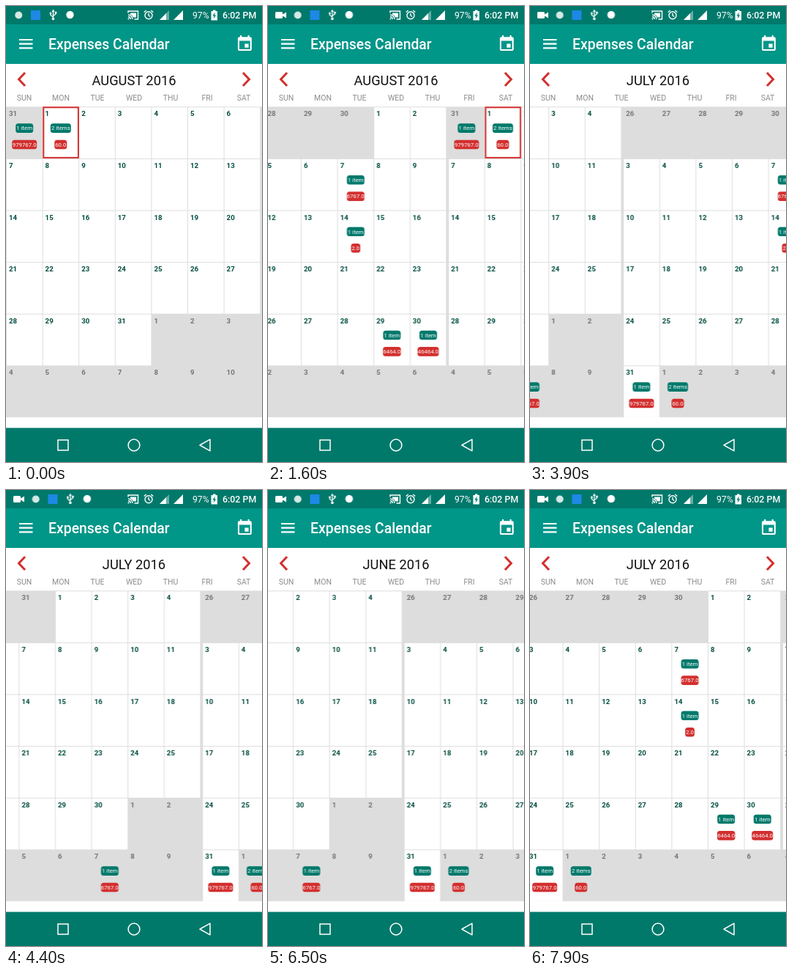
Animation of 350x622 px, one loop 8 s. Source, as an HTML page:

```html
<!DOCTYPE html>
<html lang="en">
<head>
<meta charset="utf-8">
<title>Expenses Calendar</title>
<style>
html, body { margin: 0; width: 100%; height: 100%; overflow: hidden; background: #fff; }
svg { display: block; }
text { font-family: Roboto, sans-serif; }
.day { font-size: 9.7px; font-weight: 700; fill: #004d40; }
.other { fill: #757575; }
.badge { font-size: 7.8px; fill: #fff; text-anchor: middle; }
.week { font-size: 10.5px; fill: #8c8c8c; text-anchor: middle; }
.month { font-size: 18.3px; fill: #111; text-anchor: middle; }

#pages { animation: swipe 8s linear infinite; }
#months { animation: month 8s step-end infinite; }
#icons { animation: icons 8s step-end infinite; }
#camera { animation: camera 8s step-end infinite; }

@keyframes swipe {
  0%, 5% { transform: translateX(-700px); }
  11.25% { transform: translateX(-604px); }
  20% { transform: translateX(-454px); }
  24.375% { transform: translateX(-385px); animation-timing-function: ease-out; }
  29.375%, 43.125% { transform: translateX(-350px); }
  55% { transform: translateX(-82px); }
  56.25% { transform: translateX(-58px); animation-timing-function: ease-out; }
  60%, 75% { transform: translateX(0); }
  81.25% { transform: translateX(-164px); }
  84.375% { transform: translateX(-250px); animation-timing-function: ease-out; }
  88.75%, 96.875% { transform: translateX(-350px); }
  98.75% { transform: translateX(-355px); }
  100% { transform: translateX(-362px); }
}
@keyframes month {
  0% { transform: translateY(0); }
  24.375% { transform: translateY(-40px); }
  56.25% { transform: translateY(-80px); }
  84.375%, 100% { transform: translateY(-40px); }
}
@keyframes icons {
  0% { transform: translateX(0); }
  3.75%, 100% { transform: translateX(23.4px); }
}
@keyframes camera {
  0% { opacity: 0; }
  3.75%, 100% { opacity: 1; }
}
</style>
</head>
<body>
<svg id="stage" width="350" height="622" viewBox="0 0 350 622">
  <rect width="350" height="622" fill="#fff"/>
  <g id="pages"></g>

  <!-- status bar -->
  <rect width="350" height="25" fill="#00796b"/>
  <g fill="#fff">
    <path id="camera" d="M10 9.5q0-1.5 1.5-1.5h7q1.5 0 1.5 1.5v2l5-3v8l-5-3v2q0 1.5-1.5 1.5h-7q-1.5 0-1.5-1.5z"/>
    <g id="icons">
      <circle cx="17.3" cy="12.5" r="5" fill="#d5e8e5"/>
      <rect x="34" y="6" width="13" height="13" fill="#1e88e5"/>
      <g fill="none" stroke="#fff" stroke-width="1.3">
        <path d="M64.5 7v10M64.5 15l-3.5-2.500v-2.500M64.500 13.500l3.500-2.500v-2"/>
      </g>
      <path d="M62.500 8l2-3.500 2 3.500z"/>
      <circle cx="64.5" cy="17.500" r="1.800"/>
      <circle cx="61" cy="10" r="1.400"/>
      <path d="M66.700 7.700h2.600v2.600h-2.600z"/>
      <circle cx="87.5" cy="12" r="5.200"/>
    </g>
    <g fill="none" stroke="#fff" stroke-width="1.4">
      <path d="M167 9.500v-2.500h13.500v11h-5M167 12a6 6 0 0 1 6 6M167 14.700a3.300 3.300 0 0 1 3.300 3.300"/>
      <circle cx="195" cy="12.800" r="5"/>
      <path d="M195 9.800v3.200l2.200 1.500M188.700 8.500l3-2.500M201.300 8.500l-3-2.500"/>
    </g>
    <path d="M170 9.500h8v6h-4q-1-3-4-4z"/>
    <circle cx="167.500" cy="17.500" r="1"/>
    <path d="M210 19l13-13v13z" opacity=".4"/>
    <path d="M210 19l9-9v9zM229 19l13-13v13z"/>
    <path d="M280.500 7h2.500v-1.500h3.500v1.500h2.500v12.500h-8.500z"/>
    <path d="M285.800 8.500l-3.300 5h2l-.8 4 3.500-5h-2z" fill="#00796b"/>
    <text x="255" y="17" font-size="12.2">97%</text>
    <text x="296" y="17" font-size="12.4" font-weight="500">6:02 PM</text>
  </g>

  <!-- app bar -->
  <rect y="25" width="350" height="54" fill="#009688"/>
  <path d="M18 46h18.500M18 51.700h18.500M18 57.400h18.500" stroke="#fff" stroke-width="2.2"/>
  <text x="58" y="58.700" font-size="19.4" font-weight="500" fill="#fff">Expenses Calendar</text>
  <path transform="translate(313.8 39) scale(1.05)" fill="#fff" d="M17 12h-5v5h5zM16 1v2H8V1H6v2H5c-1.100 0-2 .9-2 2v14c0 1.100.9 2 2 2h14c1.100 0 2-.9 2-2V5c0-1.100-.9-2-2-2h-1V1zm3 18H5V8h14z"/>

  <!-- month header -->
  <path d="M26 91l-8.500 9 8.500 9M324 91l8.500 9-8.500 9" fill="none" stroke="#d32f2f" stroke-width="3"/>
  <svg y="84" width="350" height="32"><g id="months"></g></svg>
  <g id="week"></g>

  <!-- navigation bar -->
  <rect y="575.500" width="350" height="46.500" fill="#00796b"/>
  <g fill="none" stroke="#fff" stroke-width="1.5">
    <rect x="71" y="592" width="14" height="14"/>
    <circle cx="175" cy="599" r="7.900"/>
    <path d="M265 599l14-7.800v15.600z" stroke-linejoin="round"/>
  </g>
</svg>
<script>
const COL = 49.6, ROW = 70.6, TOP = 137.3, PAGE = 350;
const expenses = {
  '7-7': ['1 item', '6767.0', 24],
  '7-14': ['1 item', '2.0', 12.7],
  '7-29': ['1 item', '6464.0', 24.5],
  '7-30': ['1 item', '46464.0', 29],
  '7-31': ['1 item', '979767.0', 34],
  '8-1': ['2 items', '60.0', 17]
};

function add(parent, tag, attrs, text) {
  const el = document.createElementNS('http://www.w3.org/2000/svg', tag);
  for (const k in attrs) el.setAttribute(k, attrs[k]);
  if (text !== undefined) el.textContent = text;
  parent.appendChild(el);
  return el;
}

function badge(parent, x, y, text, width, fill) {
  add(parent, 'rect', { x: x - width / 2, y: y - 6.3, width, height: 12.6, rx: 3.5, fill });
  add(parent, 'text', { x, y: y + 2.8, class: 'badge' }, text);
}

function drawMonth(month, index) {
  const page = add(document.getElementById('pages'), 'g', { transform: `translate(${index * PAGE} 0)` });
  add(page, 'rect', { y: TOP, width: PAGE, height: ROW * 6, fill: '#ddd' });
  const lead = new Date(2016, month - 1, 1).getDay();
  for (let i = 0; i < 42; i++) {
    const date = new Date(2016, month - 1, 1 - lead + i);
    const m = date.getMonth() + 1, d = date.getDate(), own = m === month;
    const x = i % 7 * COL, y = TOP + Math.floor(i / 7) * ROW;
    if (own) add(page, 'rect', { x: x + 1, y: y + 1, width: COL - 1, height: ROW - 1, fill: '#fff' });
    if (own && m === 8 && d === 1)
      add(page, 'rect', { x: x + 1.7, y: y + 1, width: COL - 2, height: ROW - 2, fill: 'none', stroke: '#d32f2f', 'stroke-width': 2 });
    add(page, 'text', { x: x + 4, y: y + 13, class: own ? 'day' : 'day other' }, d);
    const spent = expenses[m + '-' + d];
    if (spent) {
      badge(page, x + 25.2, y + 29.3, spent[0], spent[0] === '1 item' ? 24 : 28, '#00796b');
      badge(page, x + 25.2, y + 51.7, spent[1], spent[2], '#d32f2f');
    }
  }
}

[6, 7, 8].forEach(drawMonth);
['AUGUST', 'JULY', 'JUNE'].forEach((name, i) =>
  add(document.getElementById('months'), 'text', { x: 175, y: 24 + i * 40, class: 'month' }, name + ' 2016'));
['SUN', 'MON', 'TUE', 'WED', 'THU', 'FRI', 'SAT'].forEach((name, i) =>
  add(document.getElementById('week'), 'text', { x: 25 + i * 50, y: 129, class: 'week' }, name));
</script>
</body>
</html>
```
